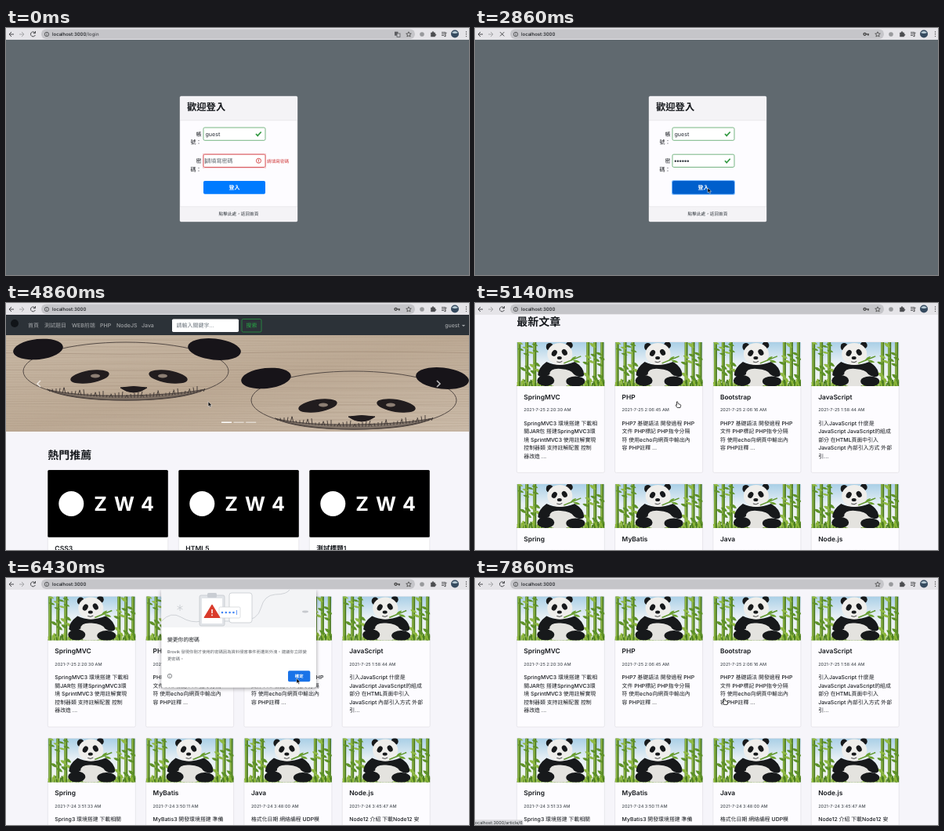
An HTML page for the animation above (8000 ms loop, 591 px wide and 315 px high).

```html
<!DOCTYPE html>
<html lang="zh-Hant">
<head>
<meta charset="utf-8">
<title>登入</title>
<style>
html, body { margin: 0; width: 100%; height: 100%; overflow: hidden; }
svg { display: block; width: 591px; height: 315px; font: 500 7px Inter, "Noto Sans CJK TC", "Noto Sans CJK", sans-serif; text-rendering: geometricPrecision; }
</style>
</head>
<body>
<svg id="stage" viewBox="0 0 591 315" fill="none"></svg>
<script>
const LOOP = 8000, TICK = LOOP / 56;
const INK = '#16191d', GREEN = '#28a745', FIELD_GREEN = '#55a364', RED = '#d03a3a', LINE = '#dcdbe0';

const text = (x, y, size, str, fill = INK, extra = '') =>
  `<text x="${x}" y="${y}" font-size="${size}" fill="${fill}" ${extra}>${str}</text>`;
const rect = (x, y, w, h, fill, extra = '') =>
  `<rect x="${x}" y="${y}" width="${w}" height="${h}" fill="${fill}" ${extra}/>`;
const oval = (cx, cy, rx, ry, fill, extra = '') =>
  `<ellipse cx="${cx}" cy="${cy}" rx="${rx}" ry="${ry}" fill="${fill}" ${extra}/>`;
const line = (d, stroke, width = 1, extra = '') =>
  `<path d="${d}" stroke="${stroke}" stroke-width="${width}" ${extra}/>`;
const shape = (d, fill) => `<path d="${d}" fill="${fill}"/>`;
const group = (id, body, extra = '') => `<g id="${id}" ${extra}>${body}</g>`;
const times = (n, fn) => Array.from({ length: n }, (_, i) => fn(i)).join('');
const HEAVY = 'font-weight="700"', TITLE = 'font-weight="600"', MIDDLE = 'text-anchor="middle"', END = 'text-anchor="end"';

// Shared artwork
const BLACK = '#17191b';
const defs = `<defs>
  <linearGradient id="sky" x2="0" y2="1"><stop stop-color="#a9cfe6"/><stop offset=".45" stop-color="#e6eff5"/><stop offset="1" stop-color="#f2f5ee"/></linearGradient>
  <linearGradient id="wood" x2="1" y2="1"><stop stop-color="#c8b8a5"/><stop offset=".5" stop-color="#bca994"/><stop offset="1" stop-color="#cbbba9"/></linearGradient>
  <filter id="shadow" x="-10%" y="-10%" width="120%" height="125%"><feDropShadow dx="0" dy="1.5" stdDeviation="2.5" flood-opacity=".4"/></filter>
  <clipPath id="banner"><rect y="41" width="591" height="123"/></clipPath>
  <clipPath id="photoBox"><rect width="112" height="56"/></clipPath>
  <g id="sketch">
    ${oval(153, 87, 131, 37, 'none', 'stroke="#544a45"')}
    ${line('M52 110Q80 124 153 124T254 110Q220 117 153 118T52 110', '#4b423e', 1, 'fill="#4b423e" fill-opacity=".55"')}
    ${times(50, i => line(`M${56 + i * 4} ${113 + 8 * Math.sin(i / 49 * Math.PI)}l${(i % 5) - 2}-${3 + i * 7 % 6}`, '#3d3532', .9))}
    ${oval(41, 59, 32, 13, '#171419', 'transform="rotate(-6 41 59)"')}
    ${oval(266, 59, 34, 13.5, '#171419', 'transform="rotate(6 266 59)"')}
    ${oval(107, 94, 25, 8, '#211c1e', 'transform="rotate(-9 107 94)"')}
    ${oval(207, 94, 25, 8, '#211c1e', 'transform="rotate(9 207 94)"')}
    ${oval(114, 93, 6, 2.5, '#8d7f74')}${oval(200, 93, 6, 2.5, '#8d7f74')}
    ${line('M146 108Q163 105 180 108Q172 114 163 114T146 108', '#211c1e', 1, 'fill="#211c1e"')}
  </g>
  <g id="photo" clip-path="url(#photoBox)">
    ${rect(0, 0, 112, 56, 'url(#sky)')}
    ${times(6, i => {
      const x = i < 3 ? 3 + i * 10 : 64 + i * 9;
      return line(`M${x} 0v56`, '#4d7a22', 4) + line(`M${x - .7} 0v56`, '#8db545', 1.8);
    })}
    ${times(30, i => {
      const x = i % 2 ? 84 + i * 17 % 25 : i * 11 % 25, y = i * 13 % 50;
      return shape(`M${x} ${y}q6-1 8 ${3 + i % 4}q-6 0-8-${3 + i % 4}`, i % 3 ? '#5d9128' : '#8fb944');
    })}
    ${times(57, i => line(`M${i * 2} 57l${i % 5 - 2}-${5 + i * 7 % 6}`, i % 2 ? '#8ab536' : '#4b7c1f', 2))}
    ${oval(55, 42, 21, 15, '#e4e3df')}
    ${shape('M38 25Q54 33 74 25Q86 32 86 42Q82 47 73 41Q70 35 56 34T42 41Q32 47 27 42Q27 33 38 25', BLACK)}
    ${oval(37, 49, 11, 7, BLACK)}${oval(75, 50, 12, 6.5, BLACK)}
    ${oval(42, 6, 4.5, 5, BLACK)}${oval(67, 4, 4.5, 4.5, BLACK)}
    ${oval(55, 15, 16, 14, '#efeeeb')}
    ${oval(48, 14, 3.2, 4.3, BLACK, 'transform="rotate(30 48 14)"')}
    ${oval(61, 13, 3.2, 4.3, BLACK, 'transform="rotate(-30 61 13)"')}
    ${oval(54.5, 20, 3, 2, BLACK)}${line('M51 25q4 2 7-.5', '#444', 1)}
    ${line('M60 27L82 18', '#5f962c', 1.5)}${shape('M68 24q3-6 8-6q-2 5-8 6m4-1q6-1 9 3q-6 1-9-3', '#6a9f2e')}
  </g></defs>`;

// Browser toolbar
const keyIcon = `<g stroke="#444" stroke-width="1.3"><circle r="1.5" cx="-2"/><path d="M-.5 0H3.5M2.4 0v2"/></g>`;
const toolbar = rect(0, 0, 591, 15, '#e5e4e8') + rect(45, 1.5, 477, 12.5, '#c5c5c9', 'rx="6.2"') +
  line('M10 8H4M7 5L4 8l3 3', '#48494c') + line('M17 8h6M20 5l3 3-3 3', '#a4a5a8') +
  group('reload', line('M37 6.2A3 3 0 1 0 37.3 9M37.5 4v2.7h-2.7', '#48494c')) +
  group('stop', line('M32 5.2l5.2 5.2m0-5.2L32 10.4', '#48494c')) +
  `<circle cx="52" cy="8" r="2.7" stroke="#48494c" stroke-width=".8"/>` + line('M52 7.6v2M52 6v.8', '#48494c', .8) +
  text(59, 10.2, 6, 'localhost:3000<tspan id="path" fill="#4b4c50">/login</tspan>') +
  group('key', keyIcon) +
  group('translate', rect(496, 4.7, 4.5, 5, '#5d5e62') + rect(499, 7, 4, 4.5, '#c5c5c9', 'stroke="#5d5e62" stroke-width=".8"')) +
  line('M514 4.8l1 2.2 2.3.2-1.8 1.5.6 2.3-2.1-1.2-2.1 1.2.6-2.3-1.8-1.5 2.3-.2z', '#444', .8) +
  oval(531, 8, 2.8, 2.8, '#98999c') +
  line('M542.4 6h1.6q0-1.6 1-1.6t1 1.6h1.6v1.7q1.4 0 1.4 1t-1.4 1V11h-5.2z', '#4c4d50', .5, 'fill="#4c4d50"') +
  line('M556 5.5h5M556 7.5h5M556 9.5h3M561 10.5V6.2h1.6', '#4c4d50', .9) + oval(560.3, 10.3, 1, .9, '#4c4d50') +
  oval(573, 7.5, 5, 5, '#354a5f') + shape('M569 6q4-4 8 0q-4 2-8 0', '#b9ccd6') +
  times(3, i => oval(587.5, 5 + i * 2.8, .7, .7, '#444'));

// Login page
const tick = y => line(`M319 ${y}l2.2 2.4 4.5-4.9`, '#349a43', 1.7);
const field = (y, stroke, extra = '') => rect(252, y, 79, 16.3, '#fff', `rx="1.7" stroke="${stroke}" stroke-width=".8" ${extra}`);
const login = rect(0, 15, 591, 300, '#60696f') +
  rect(222, 87, 150, 160, '#fdfcff', 'rx="1.7" stroke="#cfced3" stroke-width=".5"') +
  rect(222.2, 87.2, 149.6, 30.5, '#f4f3f6', 'rx="1.5"') + rect(222.2, 228, 149.6, 18.8, '#f4f3f6', 'rx="1.5"') +
  line('M222 117.8h150M222 227.8h150', LINE, .6) +
  text(231, 104.5, 12.3, '歡迎登入', INK, HEAVY) +
  [['帳', 137.6], ['號：', 148.1], ['密', 172], ['碼：', 182.5]].map(([s, y]) => text(249.5, y, 7, s, INK, END)).join('') +
  field(127, FIELD_GREEN) + text(254.5, 137.6, 7, 'guest', '#40464d') + tick(135) +
  group('invalid', field(161.2, RED, 'style="outline:1.2px solid #dc354540;outline-offset:.3px"') +
    text(254.5, 172, 7, '請填寫密碼', '#5f666d') +
    `<circle cx="322.5" cy="169.3" r="3" stroke="${RED}" stroke-width=".9"/>` + line('M322.5 167.5v2.3M322.5 170.4v.9', RED, .9) +
    text(333, 171.5, 5.65, '請填寫密碼', RED)) +
  group('valid', group('glow', rect(251, 160.2, 81, 18.3, '#79c48a', 'rx="2.4"')) + field(161.2, FIELD_GREEN) + tick(169.3) +
    times(6, i => `<circle class="dot" cx="${255.8 + i * 3.2}" cy="169.7" r="1.25" fill="#3a4047"/>`)) +
  line('M0 166v7', INK, .6, 'id="caret"') +
  rect(251, 194, 81, 18.8, '#80bdff', 'id="ring" rx="2.6"') + rect(252, 195, 79, 16.8, '#007bff', 'id="submit" rx="1.8"') +
  text(291.5, 206, 7, '登入', '#fff', MIDDLE + ' ' + HEAVY) +
  text(297, 239.4, 5.65, '點擊此處，返回首頁', '#343a40', MIDDLE);

// Home page
const navItems = [[28, '首頁'], [49, '測試題目'], [84, 'WEB前端'], [120, 'PHP'], [141, 'NodeJS'], [173, 'Java']];
const navbar = rect(0, 15, 591, 26.5, '#2c3238') + oval(11, 26, 5, 5, '#111418') +
  navItems.map(([x, s]) => text(x, 31.4, 7, s, '#a0a3a6')).join('') +
  rect(212, 20.5, 85, 16.5, '#fff', 'rx="1.7"') + text(217.5, 31.4, 7, '請輸入關鍵字...', '#6c757d') +
  rect(301, 20.5, 25, 16.5, 'none', `rx="1.7" stroke="${GREEN}" stroke-width=".7"`) + text(313.5, 31.4, 7, '搜索', GREEN, MIDDLE) +
  text(579, 31.4, 7, 'guest', '#a0a3a6', END) + line('M582 28h4l-2 2z', '#a0a3a6', .2, 'fill="#a0a3a6"');

const carousel = `<g clip-path="url(#banner)">` + rect(0, 41, 591, 123, 'url(#wood)') +
  times(40, i => line(`M0 ${42 + i * 3.1}q150 ${3 * Math.sin(i * 2)} 300 0t291 0`, i % 7 ? '#a99581' : '#8d7865', .6, `opacity="${.25 + i * 7 % 5 * .1}"`)) +
  '<use href="#sketch"/><use href="#sketch" x="291" y="37"/></g>' +
  line('M44 99l-4 4 4 4M550 99l4 4-4 4', '#fff', 1.6, 'opacity=".7"') +
  times(3, i => rect(275 + i * 15.6, 151.5, 13, 1.5, '#fff', `opacity="${i ? .5 : 1}"`));

const hotCards = ['CSS3', 'HTML5', '測試標題1'].map((title, i) => `<g transform="translate(${53.3 + i * 167} 213)">` +
  rect(0, 0, 153.5, 214, '#fff', `rx="1.7" stroke="${LINE}" stroke-width=".6"`) + rect(0, 0, 153.5, 85.7, '#000', 'rx="1.5"') +
  oval(30, 43, 16, 16, '#fff') + text(59, 52, 25, 'ZW4', '#fff', `letter-spacing="9" ${HEAVY}`) +
  text(9, 103, 8.6, title, INK, TITLE) + '</g>').join('');

const phpLines = ['PHP7 基礎語法 開發過程 PHP', '文件 PHP標記 PHP指令分隔', '符 使用echo向網頁中輸出內', '容 PHP註釋 ...'];
const articles = [
  ['SpringMVC', '25 2:20:30', ['SpringMVC3 環境搭建 下載相', '關JAR包 搭建SpringMVC3環', '境 SprintMVC3 使用註解實現', '控制器類 支持註解配置 控制', '器改造 ...']],
  ['PHP', '25 2:06:45', phpLines],
  ['Bootstrap', '25 2:06:16', phpLines],
  ['JavaScript', '25 1:58:44', ['引入JavaScript 什麼是', 'JavaScript JavaScript的組成', '部分 在HTML頁面中引入', 'JavaScript 內部引入方式 外部', '引...']],
  ['Spring', '24 3:51:33', ['Spring3 環境搭建 下載相關']],
  ['MyBatis', '24 3:50:11', ['MyBatis3 開發環境搭建 準備']],
  ['Java', '24 3:48:00', ['格式化日期 網絡編程 UDP模']],
  ['Node.js', '24 3:45:47', ['Node12 介紹 下載Node12 安']],
];
const articleCards = articles.map(([title, time, lines], i) =>
  `<g transform="translate(${53.3 + i % 4 * 125.3} ${50 + (i >> 2) * 181})">` +
  rect(0, 0, 112, 166.5, '#fdfcff', `rx="1.7" stroke="${LINE}" stroke-width=".6"`) + '<use href="#photo"/>' +
  text(9, 72.9, 8.4, title, INK, TITLE) + text(9, 88.2, 5.55, `2021-7-${time} AM`, '#4c5258') +
  lines.map((s, k) => text(9, 105.7 + k * 10.55, 6.9, s)).join('') + '</g>').join('');

const LATEST_TOP = 442;
const home = rect(0, 15, 591, 900, '#f6f5fa') + navbar + carousel +
  text(53.3, 199.3, 14, '熱門推薦', INK, HEAVY) + hotCards +
  `<g transform="translate(0 ${LATEST_TOP})">` + text(53.3, 29, 14, '最新文章', INK, HEAVY) + articleCards + '</g>';

// Password warning
const GREY = '#c6c9ce';
const dialog = rect(198.5, 14.5, 197.5, 125, '#fff', 'rx="2" filter="url(#shadow)"') + rect(198.5, 15, 197.5, 48, '#f3f4f6') +
  line('M198.5 55q12-13 25-5t26 5h52q20-1 24-17t18-17q16 0 19-7', GREY, .8) +
  line('M222 34v8M218.5 36l7 4M218.5 40l7-4', GREY, .8) + oval(382, 43, 4, 1.4, GREY) +
  rect(285, 19, 29, 38, '#fff', `rx="3" stroke="${GREY}" stroke-width=".8"`) +
  rect(247, 22, 32, 39, '#e1e4e8', `rx="2" stroke="${GREY}" stroke-width=".8"`) + rect(250, 26, 26, 32, '#fff') +
  rect(257, 19, 12, 6, '#c9cdd3', 'rx="1.5"') +
  rect(272, 37, 27, 14, '#fff', `rx="1.5" stroke="${GREY}" stroke-width=".6"`) +
  times(4, i => oval(276 + i * 4.8, 44, 1.3, 1.3, '#4285f4')) + line('M294.5 41v6', '#4285f4', .8) +
  line('M263 34l10 16.5h-20z', '#d93a2b', 1, 'fill="#d93a2b"') + line('M263 40v5M263 46.5v1.7', '#fff', 1.5) +
  text(206, 80.5, 6.8, '變更你的密碼') +
  text(206, 96.2, 5.35, 'Brovik 發現你剛才使用的密碼因為資料侵害事件而遭到外洩。建議你立即變', '#5f6368') +
  text(206, 105.2, 5.35, '更密碼。', '#5f6368') +
  '<circle cx="209" cy="125" r="2.7" stroke="#5f6368" stroke-width=".7"/>' + line('M209 124.5v2M209 123v.7', '#5f6368', .7) +
  rect(360, 118.3, 28.3, 14, '#1a73e8', 'rx="1.8"') + text(374.2, 127.3, 5.4, '確定', '#fff', MIDDLE + ' ' + HEAVY);

const status = rect(-2, 308.8, 63, 8, '#dddde1', 'rx="1.5" stroke="#bbb" stroke-width=".4"') +
  text(-1.6, 314.2, 5.4, 'localhost:3000/article/6', '#3c4043');

const pointer =
  group('arrow', '<path d="M0 0v6.4l1.5-1.3 1 2.3 1.1-.5-1-2.2h2z" fill="#000" stroke="#fff" stroke-width=".5"/>') +
  group('hand', '<path d="M-.6 0q.9-.8 1.4.2l.5 2.4 2.8.8q.9.4.6 1.7l-.7 2.4H.3L-2 4.4q.3-.9 1.6 0z" fill="#fff" stroke="#000" stroke-width=".7"/>');

document.getElementById('stage').innerHTML = defs + group('login', login) + group('home', home) +
  group('dialog', dialog) + group('status', status) + toolbar + group('pointer', pointer);

// Timeline
const el = id => document.getElementById(id);
const dots = [...document.querySelectorAll('.dot')];
const show = (id, on) => el(id).setAttribute('display', on ? 'inline' : 'none');
const move = (id, x, y) => el(id).setAttribute('transform', `translate(${x} ${y})`);

const KEY_TIMES = [420, 710, 990, 1280, 1560, 1850];
const CLICK = 2850, LOADED = 4420, WARN = 5560, DISMISS = 6700;
const scrollKeys = [[4860, 0], [5000, 215], [5142, 442], [5285, 462], [5428, 468.5]];
const pointerKeys = [[2140, 300, 228], [2710, 297, 204], [3290, 297, 203], [4140, 296, 177.5], [4860, 258, 125.5],
  [5142, 258, 126], [6000, 258, 126], [6428, 371, 128], [6860, 371, 128], [7570, 318, 154]];

function sample(keys, t) {
  const next = keys.findIndex(k => k[0] > t);
  if (next < 0) return keys.at(-1).slice(1);
  if (next === 0) return keys[0].slice(1);
  const a = keys[next - 1], b = keys[next], p = (t - a[0]) / (b[0] - a[0]);
  return a.slice(1).map((v, i) => v + (b[i + 1] - v) * p);
}

function draw(t) {
  const typed = KEY_TIMES.filter(k => t >= k).length;
  const clicked = t >= CLICK, loaded = t >= LOADED, loading = clicked && !loaded;
  show('login', !loaded);
  show('home', loaded);
  show('invalid', !typed);
  show('valid', typed);
  show('glow', !clicked);
  show('caret', !clicked);
  show('ring', clicked);
  move('caret', 254.3 + typed * 3.2, 0);
  dots.forEach((dot, i) => dot.setAttribute('display', i < typed ? 'inline' : 'none'));
  el('submit').setAttribute('fill', clicked ? '#005fcc' : t > 2560 ? '#0069d9' : '#007bff');

  show('stop', loading);
  show('reload', !loading);
  show('path', !clicked);
  show('translate', !clicked);
  show('key', typed && t < DISMISS);
  move('key', clicked ? 499.5 : 486, 7.8);

  move('home', 0, -sample(scrollKeys, t)[0]);
  show('dialog', t >= WARN && t < DISMISS);
  show('status', t >= 7280);

  const hand = (t > 4990 && t < WARN) || t > 7130;
  show('pointer', t >= 2140);
  show('arrow', !hand);
  show('hand', hand);
  move('pointer', ...sample(pointerKeys, t));
}

function loop(now) {
  // Motion is stepped, as in a screen recording at seven pictures per second.
  draw(Math.floor((now % LOOP + 5) / TICK) * TICK);
  requestAnimationFrame(loop);
}
draw(0);
requestAnimationFrame(loop);
</script>
</body>
</html>
```
